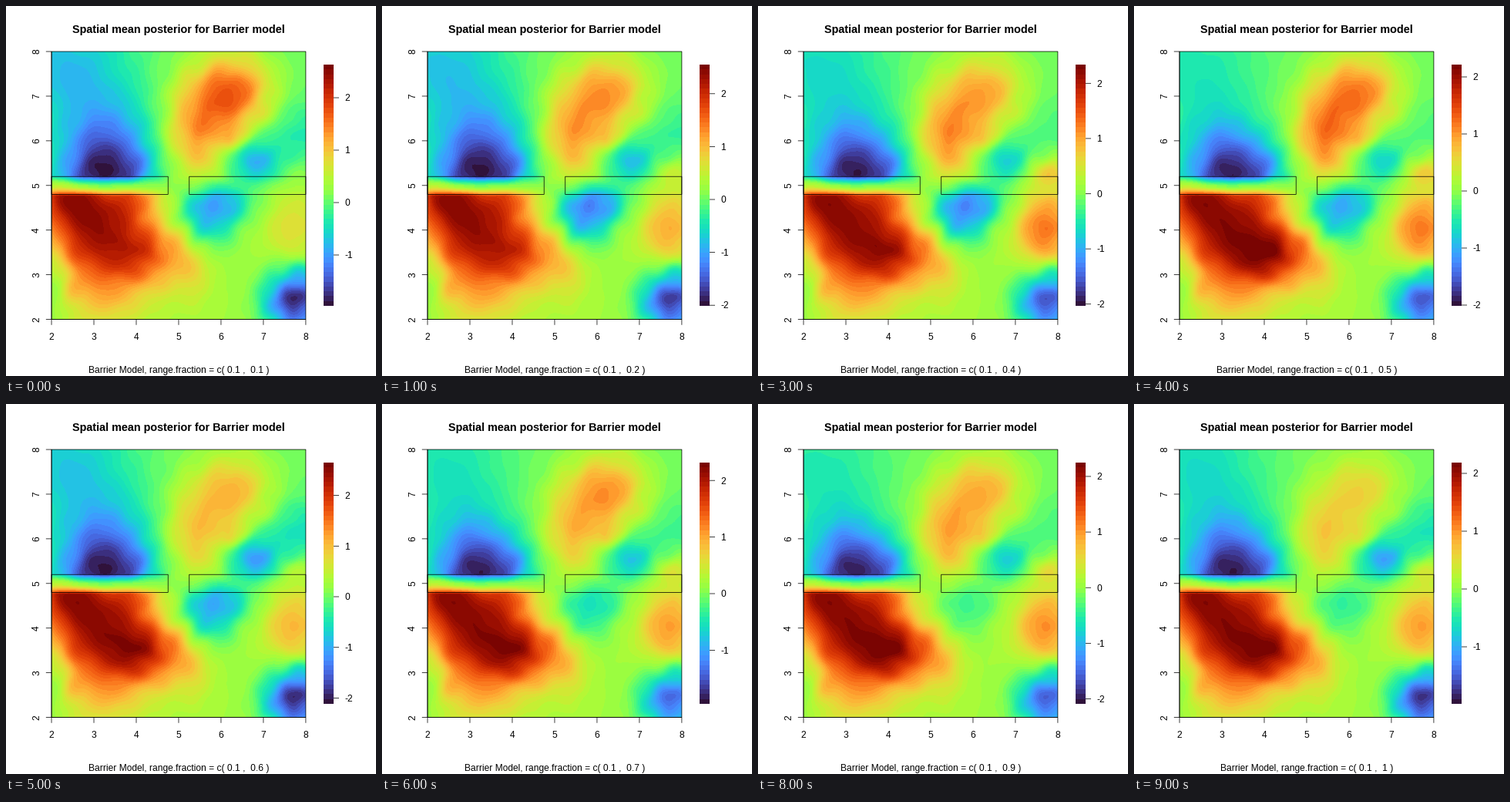
Write a matplotlib script that moves like this. It is 480x480 px and loops after 10 s.

```python
import numpy as np
import matplotlib.pyplot as plt
from matplotlib.animation import FuncAnimation
from matplotlib.patches import Rectangle

plt.rcParams["font.family"] = ["Liberation Sans", "DejaVu Sans"]
PX = 0.75                                   # points per pixel at 96 dpi
L, R, T, B = 59.04, 388.9, 59.04, 406.56    # map box
BAR = (412, 425, 76, 389)                   # colour bar box
LEVELS = 50

# Key steps (tenths of range) and how each region rises or sinks at them
KEYS = [1, 3, 5, 6, 7, 8, 10]
ZERO = [255, 247, 240, 250, 246, 236.5, 240]      # pixel row of level 0
UNIT = [68, 69.2, 74, 65.7, 73.4, 69.3, 75]       # pixels per unit
REGION = {
    "northwest": [-6, -4, 3, -4, 2, 7, 0],
    "crest": [6, -4, 3, -2, 1, 2, -5],
    "slope": [-2, 3, 5, -4, -4, 5, -3],
    "cove": [-3, 1, 2, -6, 0, 8, -5],
    "east": [-11, 6, 5, -4, 0, 4, 0],
    "gap": [-3, -9, -2, -2, 5, 10, 8],
    "red": [-8, -7, 5, 1, 2, 5, 4],
    "corner": [-5, 0, 1, -5, 4, 9, -4],
}
# Gaussian hills: x, y, width, depth, height in percent of the range, region
UPPER = 44, [
    (3.15, 5.2, 0.70, 0.90, -41, None),
    (4.0, 5.4, 0.40, 0.40, -10, None),
    (2.4, 7.6, 1.00, 0.90, -12, "northwest"),
    (3.7, 6.4, 0.60, 0.60, 0, "northwest"),
    (5.4, 6.0, 0.50, 0.70, 21, "slope"),
    (6.4, 7.1, 0.60, 0.60, 20, "crest"),
    (5.7, 6.9, 0.65, 0.70, 9, "crest"),
    (6.3, 6.1, 0.20, 0.20, 8, None),
    (6.8, 5.5, 0.40, 0.35, -18, "cove"),
    (7.9, 6.1, 0.60, 0.50, -6, "cove"),
    (7.8, 5.2, 0.45, 0.35, 16, "east"),
]
LOWER = 50, [
    (2.9, 4.2, 0.85, 0.85, 44, None),
    (2.2, 4.9, 0.50, 0.40, 20, None),
    (3.9, 4.8, 0.40, 0.40, 14, None),
    (4.2, 3.5, 0.65, 0.50, 33, "red"),
    (3.2, 2.6, 0.80, 0.60, 12, None),
    (2.0, 3.0, 0.35, 0.70, -11, None),
    (5.3, 3.3, 0.35, 0.60, 10, None),
    (5.6, 4.2, 0.45, 0.50, -18, "gap"),
    (6.1, 4.7, 0.55, 0.40, -16, "gap"),
    (7.7, 4.0, 0.50, 0.65, 21, "east"),
    (7.75, 2.45, 0.50, 0.50, -42, "corner"),
]


def between(values, step):
    """Value of a key series at a step, linear between keys."""
    return np.interp(step, KEYS, values)


def ripple(x, y, rng, size=0.02, waves=6):
    """Small random waves that roughen the contours."""
    total = 0
    for angle, phase in rng.uniform(0, 2 * np.pi, (waves, 2)):
        k = rng.uniform(5, 11)
        total = total + np.sin(k * (x * np.cos(angle) + y * np.sin(angle)) + phase)
    return size * total


NX, NY = 330, 347
x, y = np.meshgrid(2 + 6 * (np.arange(NX) + 0.5) / NX,
                   8 - 6 * (np.arange(NY) + 0.5) / NY)
rng = np.random.default_rng(4)
wx, wy = x + ripple(x, y, rng), y + ripple(x, y, rng)

# Blend the halves across the barrier, flattening on its western arm
ramp = np.clip((y - 4.77) / 0.44, 0, 1)
west = 1 / (1 + np.exp((x - 4.7) / 0.1))
flat = 1 - 0.5 * west * (1 - abs(2 * ramp - 1))


def shapes(hills):
    return [np.exp(-((wx - cx) / sx) ** 2 / 2 - ((wy - cy) / sy) ** 2 / 2)
            for cx, cy, sx, sy, *_ in hills]


SHAPES = {id(half): shapes(half[1]) for half in (UPPER, LOWER)}


def relief(half, step):
    base, hills = half
    total = np.full_like(x, base - 47.0)
    for (*_, height, region), shape in zip(hills, SHAPES[id(half)]):
        if region:
            height += between(REGION[region], step)
        total += height * shape
    return total


def surface(step):
    mix = relief(UPPER, step) * ramp + relief(LOWER, step) * (1 - ramp)
    return 47 + mix * flat


fig = plt.figure(figsize=(5, 5), dpi=96, facecolor="white")
ax = fig.add_axes([0, 0, 1, 1])
ax.axis("off")
cmap = plt.get_cmap("turbo", LEVELS)


def text(tx, ty, s, size=12, **kw):
    kw = {"ha": "center", "va": "baseline", **kw}
    return ax.text(tx, ty, s, fontsize=size * PX, **kw)


def line(xs, ys):
    return ax.plot(xs, ys, color="black", lw=0.75 * PX, snap=False,
                   solid_capstyle="butt")[0]


def box(x0, x1, y0, y1):
    ax.add_patch(Rectangle((x0, y0), x1 - x0, y1 - y0, fill=False,
                           ec="black", lw=0.75 * PX, snap=False))


def px(v):
    return L + (v - 2) / 6 * (R - L)


def py(v):
    return B - (v - 2) / 6 * (B - T)


def image(data, extent):
    return ax.imshow(data, extent=extent, cmap=cmap, vmin=0, vmax=100,
                     aspect="auto", interpolation="nearest", zorder=0)


field = image(surface(1), (L, R, B, T))
x0, x1, y0, y1 = BAR
image((np.arange(LEVELS)[::-1, None] + 0.5) * 100 / LEVELS, (x0, x1, y1, y0))
ax.set(xlim=(0, 480), ylim=(480, 0))

box(L, R, T, B)
box(px(2), px(4.75), py(5.2), py(4.8))
box(px(5.25), px(8), py(5.2), py(4.8))
line([L, R], [B, B])
line([L, L], [T, B])
for v in range(2, 9):
    line([px(v)] * 2, [B, B + 7.2])
    line([L - 7.2, L], [py(v)] * 2)
    text(px(v), 433, str(v))
    text(43, py(v), str(v), rotation=90, rotation_mode="anchor")

text(224, 35, "Spatial mean posterior for Barrier model", 14.4, weight="bold")
caption = text(224, 476, "")
ticks = [(v, line([x1, x1 + 7], [0, 0]), text(439, 0, str(v), ha="left"))
         for v in range(-2, 3)]


def draw(i):
    step = i + 1
    field.set_data(surface(step))
    caption.set_text(f"Barrier Model, range.fraction = c( 0.1 ,  {step / 10:g} )")
    zero, unit = between(ZERO, step), between(UNIT, step)
    for v, mark, label in ticks:
        row = zero - v * unit
        mark.set_ydata([row, row])
        label.set_y(row + 4.3)
        for part in (mark, label):
            part.set_visible(y0 <= row <= y1)
    return [field, caption]


anim = FuncAnimation(fig, draw, frames=10, interval=1000, repeat=True,
                     repeat_delay=0, blit=False)
plt.show()
```
